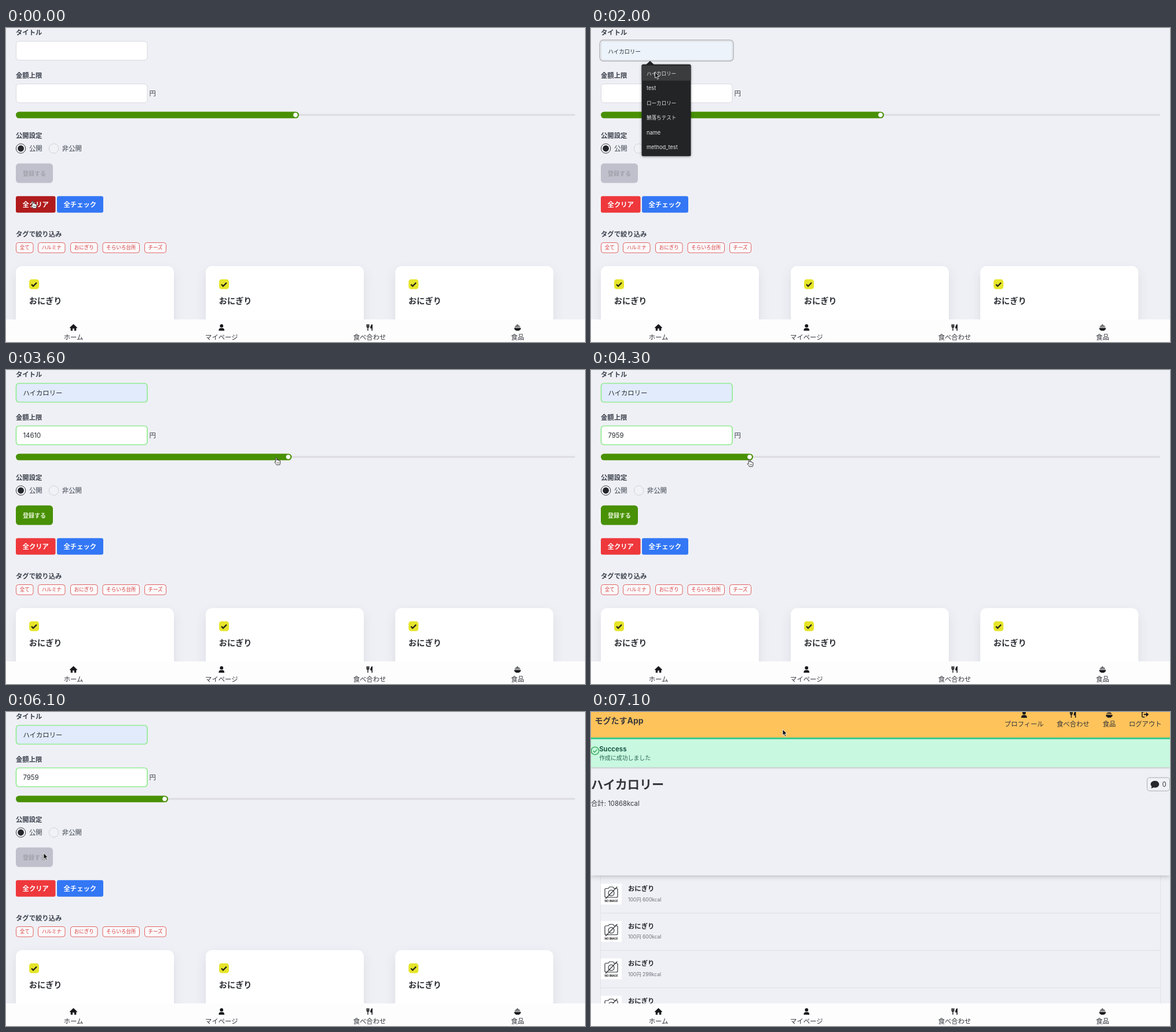
Recreate the animation shown at these times as an HTML page. Size 1000x542 px, loop 7.2 s.

```html
<!DOCTYPE html>
<html lang="ja">
<head>
<meta charset="utf-8">
<title>食べ合わせ登録</title>
<style>
  html, body { margin: 0; width: 100%; height: 100%; overflow: hidden; background: #eff0f5; }
  svg { display: block; width: 100%; height: 100%; }
  text { font-family: Inter, "Noto Sans CJK JP", "Noto Sans CJK", sans-serif; white-space: pre; }
  .card { filter: drop-shadow(0 8px 9px rgba(30, 35, 60, .09)); }
  .panel { filter: drop-shadow(0 2px 4px rgba(30, 35, 60, .25)); }
</style>
</head>
<body>
<svg id="stage" viewBox="0 0 1000 542"></svg>
<script>
const LOOP = 7200, STEP = 100;
const INK = '#3a404c', DARK = '#262a30', GREEN = '#489004', LIME = '#93ec93';

// Text is placed by its vertical middle.
const text = (x, mid, str, size = 11.35, fill = INK, extra = '') =>
  `<text x="${x}" y="${mid + size * .37}" font-size="${size}" fill="${fill}" ${extra}>${str}</text>`;
const bold = (x, mid, str, size, fill, extra = '') =>
  text(x, mid, str, size, fill, 'font-weight="700" ' + extra);
const rect = (x, y, w, h, r, fill, extra = '') =>
  `<rect x="${x}" y="${y}" width="${w}" height="${h}" rx="${r}" fill="${fill}" ${extra}/>`;
const circle = (x, y, r, fill, extra = '') =>
  `<circle cx="${x}" cy="${y}" r="${r}" fill="${fill}" ${extra}/>`;
const path = (d, fill, extra = '') => `<path d="${d}" fill="${fill}" ${extra}/>`;
const line = (color, width) =>
  `stroke="${color}" stroke-width="${width}" stroke-linecap="round" stroke-linejoin="round"`;
const group = (id, body, extra = '') => `<g id="${id}" ${extra}>${body}</g>`;
const at = (x, y, body) => `<g transform="translate(${x} ${y})">${body}</g>`;

const icons = {
  home: path('M-6.6 .2L0-6L6.6 .2L5.6 1.2L4.8 .5V5.5H1.4V1.8H-1.4V5.5H-4.8V.5L-5.6 1.2Z', '#17181b'),
  user: circle(0, -2.8, 2.9, '#17181b') + path('M-5 5.6C-5 2.4-3.4 1-1.4 1H1.4C3.4 1 5 2.4 5 5.6Z', '#17181b'),
  fork: path('M-4.7-5V-1.6Q-4.7 0-3 0Q-1.2 0-1.2-1.6V-5M-3-5V5', 'none', line('#17181b', 1.4)) +
    path('M5-5.8V5.4H3.4V1.4H1.2C1-2.4 2.6-5.2 5-5.8Z', '#17181b'),
  bowl: path('M-5.8 .7H5.8C5.8 3 4.6 4.2 3 4.8V5.4H-3V4.8C-4.6 4.2-5.8 3-5.8 .7Z', '#17181b') +
    path('M-4.6-1H4.8M-3.2-2.9H3.4M-1.2-4.6H1.4', 'none', 'stroke="#17181b" stroke-width="1.5" stroke-dasharray="1.6 .7"'),
  exit: path('M-1.5-4.5H-4.2Q-5.5-4.5-5.5-3.2V3.2Q-5.5 4.5-4.2 4.5H-1.5', 'none', line('#17181b', 1.6)) +
    path('M-2.5-1H1.5V-4L6 0L1.5 4V1H-2.5Z', '#17181b')
};
const navItem = (x, y, icon, label) =>
  at(x, y, icons[icon]) + text(x, y + 16.7, label, 11.35, '#303238', 'text-anchor="middle"');

const field = (id, y) =>
  rect(15.2, y - 1.8, 230.8, 36.6, 6.5, '#f4f5f8', `id="${id}Ring" stroke="#b4b6bc" stroke-width="1.5"`) +
  rect(17.5, y + .5, 226.5, 32.5, 5, '#fff', `id="${id}Box" stroke="#d8d9df"`) +
  text(29.5, y + 17, '', 11.35, DARK, `id="${id}Text"`);

const popup = (id, y, width, items) => group(id,
  path(`M95 ${y + .5}L102 ${y - 6}L109 ${y + .5}Z`, '#222426') +
  rect(87.5, y, width, 158.5, 2.5, '#222426', 'style="filter:drop-shadow(0 1px 2px rgba(0,0,0,.35))"') +
  rect(87.5, y + 2, width, 26, 0, '#3a3c3e', `id="${id}Hover"`) +
  items.map((s, i) => text(96, y + 15.7 + 25.5 * i, s, /^\w+$/.test(s) ? 9.25 : 8.55, '#e6e7e9')).join(''));

const tags = [[17.5, 29.5, '全て'], [55.5, 46.5, 'ハルミナ'], [111.5, 46.5, 'おにぎり'], [167, 63.5, 'そらいろ台所'], [239.5, 37, 'チーズ']]
  .map(([x, w, s]) => rect(x, 370.5, w, 17.5, 4, '#fbf9fb', 'stroke="#e06464"') +
    text(x + w / 2, 379.3, s, 8.55, '#d83c3c', 'text-anchor="middle"')).join('');

const card = x => rect(x, 411, 273, 160, 11, '#fff', 'class="card"') +
  rect(x + 23, 433.8, 17, 17, 4.5, '#e6e52b') +
  path(`M${x + 27} 442.6l3 3l6-6`, 'none', 'stroke="#26261a" stroke-width="2.2"') +
  bold(x + 22.8, 470.5, 'おにぎり', 14.2, '#2a2d33');

const form =
  bold(17, 8.3, 'タイトル') + field('title', 22.5) +
  bold(17, 82.2, '金額上限') + field('price', 96) + text(247.5, 113.2, '円') +
  group('spinner', rect(221.8, 106, 10.5, 15, 2.5, '#ececee') +
    path('M224.8 111.6L227 108.8L229.2 111.6ZM224.8 115.2L227 118L229.2 115.2Z', '#4a4c50')) +
  rect(29.2, 106.5, 1, 14, 0, '#333', 'id="caret"') +
  rect(17, 148.4, 966, 3.2, 1.6, '#dbdce1') +
  rect(17, 144.4, 489, 11.4, 5.7, GREEN, 'id="bar"') + circle(500, 150.1, 3.8, '#fff', 'id="thumb"') +
  bold(17, 185.5, '公開設定') +
  circle(25.6, 208, 8.2, '#f6f7f9', 'stroke="#30343a"') + circle(25.6, 208, 5.4, '#23262b') + text(40, 208.2, '公開') +
  circle(82.5, 208, 8.2, '#f1f2f6', 'stroke="#d0d1d7"') + text(96.8, 208.2, '非公開') +
  rect(17, 233.8, 64, 33.8, 5.5, '#c0c0cc', 'id="send"') + bold(29, 250.8, '登録する', 10, '#a0a1aa', 'id="sendText"') +
  rect(17, 290.3, 68.5, 28.5, 3, '#ee383c', 'id="clear"') + bold(28.6, 304.5, '全クリア', 11.35, '#fff') +
  rect(88, 290.3, 80, 28.5, 3, '#3377f5') + bold(99.5, 304.5, '全チェック', 11.35, '#fff') +
  bold(17, 355.5, 'タグで絞り込み') + tags +
  [17, 345, 672.3].map(card).join('') +
  popup('titleList', 62.8, 85, ['ハイカロリー', 'test', 'ローカロリー', '鯖落ちテスト', 'name', 'method_test']) +
  popup('priceList', 136.5, 68.5, ['9', '1000', '100000', '5000000', 'aaa', '1000000']);

const noImage = rect(17, -17.7, 36, 36, 0, '#fff') +
  path('M26-9.5H30L31.8-12H38L39.8-9.5H44Q46-9.5 46-7.5V4Q46 6 44 6H26Q24 6 24 4V-7.5Q24-9.5 26-9.5Z', 'none', line('#33353a', 1.2)) +
  circle(35, -1.6, 5, 'none', 'stroke="#33353a" stroke-width="1.2"') +
  path('M25.5 8L45-12', 'none', line('#33353a', 1.3)) +
  bold(35, 12.3, 'NO IMAGE', 4.6, '#222', 'text-anchor="middle"');
const row = (kcal, i) => at(0, 314 + 64.5 * i,
  noImage + bold(64, -9, 'おにぎり', 11.35, '#22252b') + text(64, 9.7, `100円 ${kcal}kcal`, 8.5, '#6c707a') +
  rect(17, 32.5, 966, 1.2, 0, '#e1e2e7'));

const result =
  path('M16.5 270V542M983.5 270V542', 'none', 'stroke="#e1e2e7"') +
  [600, 600, 299, 299].map(row).join('') +
  rect(0, 90, 1000, 192, 0, '#eff0f5', 'class="panel"') +
  rect(0, 44, 1000, 51.5, 0, '#c8f8e0', 'style="filter:drop-shadow(0 1px 1.5px rgba(0,0,0,.25))"') +
  rect(0, 0, 1000, 44.3, 0, '#ffc35c') + rect(0, 44, 1000, 3, 0, '#3ec98c') +
  bold(6.5, 14.5, 'モグたすApp', 14, '#3b3b3b') +
  navItem(748, 4.3, 'user', 'プロフィール') + navItem(832.5, 4.3, 'fork', '食べ合わせ') +
  navItem(895, 4.3, 'bowl', '食品') + navItem(957.3, 4.3, 'exit', 'ログアウト') +
  circle(7, 67, 6.6, 'none', 'stroke="#2fa650" stroke-width="1.3"') +
  path('M4 67.3l2.2 2.2l4-4.4', 'none', line('#2fa650', 1.3)) +
  bold(14.2, 64.3, 'Success', 11.35, '#1d5b49') + text(14.2, 79.3, '作成に成功しました', 9.9, '#2a6654') +
  bold(0, 125, 'ハイカロリー', 21.1, '#34373d') + text(0, 157.8, '合計: 10868kcal', 11.35, '#34373d') +
  rect(960.5, 113.2, 39, 23, 4.5, '#f0f1f5', 'stroke="#a9abb3"') +
  path('M967 131.5Q968.3 130.2 968.5 128.6C964 124 968 118.7 974 118.7C978.3 118.7 981.2 121.5 981.2 124.7C981.2 128.8 976.5 131.6 971.5 130.3Q969.5 131.6 967 131.5Z', '#25272c') +
  text(986.5, 125.2, '0', 11.35, '#34373d');

const cursors = {
  arrow: path('M0 0V10.4L2.4 8.3L4.2 12.3L6 11.5L4.2 7.6H7.4Z', '#111', 'stroke="#fff" stroke-width=".8"'),
  hand: path('M-.9 6.5V1Q-.9-.2 .1-.2Q1.1-.2 1.1 1V4.3Q3-.1 3.2 4.6Q5 3.4 5.1 5.2Q7 4.5 7 6.4V8.6Q7 10.2 6 12.2H.6Q-.6 10.2-2.8 7.8Q-2.6 6.1-.9 7.4Z', '#fff', line('#222', .9)) +
    path('M1.7 7.6V10M3.3 7.6V10M4.9 7.6V10', 'none', 'stroke="#222" stroke-width=".6"'),
  beam: path('M-2.2-5.5Q0-5.5 0-4Q0-5.5 2.2-5.5M0-4V4M-2.2 5.5Q0 5.5 0 4Q0 5.5 2.2 5.5M-1.2 1.8H1.2', 'none', line('#222', 1))
};

document.getElementById('stage').innerHTML =
  rect(0, 0, 1000, 542, 0, '#eff0f5') + group('form', form) + group('result', result) +
  rect(0, 503, 1000, 40, 0, '#fdfdfe') +
  navItem(116.5, 517, 'home', 'ホーム') + navItem(372.3, 517, 'user', 'マイページ') +
  navItem(628, 517, 'fork', '食べ合わせ') + navItem(883.5, 517, 'bowl', '食品') +
  group('cursor', Object.keys(cursors).map(k => group(k, cursors[k])).join(''));

const el = id => document.getElementById(id);
const set = (id, attrs) => { for (const k in attrs) el(id).setAttribute(k, attrs[k]); };
const show = (id, on) => set(id, { visibility: on ? 'inherit' : 'hidden' });

// time, x, y, pointer shape from then on
const track = [
  [0, 46, 299, 'hand'], [300, 46, 299, 'hand'], [500, 62, 245, 'arrow'], [900, 93, 145, 'arrow'],
  [1200, 101, 42, 'beam'], [1500, 101, 42, 'beam'], [1700, 108, 66, 'arrow'], [2000, 110.5, 76, 'arrow'],
  [2400, 110.5, 77, 'arrow'], [2600, 97, 114.5, 'beam'], [3100, 97, 114.5, 'beam'], [3200, 190, 125, 'beam'],
  [3500, 499, 151, 'hand'], [4200, 273, 154.5, 'hand'], [4500, 273, 154.5, 'hand'], [4700, 200, 185, 'arrow'],
  [5100, 65, 243.5, 'hand'], [5500, 65, 243.5, 'arrow'], [6300, 65, 243.5, 'arrow'], [6900, 331, 30, 'arrow'],
  [LOOP, 331, 30, 'arrow']
];
const ease = p => p * p * (3 - 2 * p);
const mix = (a, b, p) => a + (b - a) * p;
const progress = (t, from, to) => ease(Math.min(1, Math.max(0, (t - from) / (to - from))));

function drawField(id, value, focused, filled, fill, size) {
  show(id + 'Ring', focused);
  set(id + 'Box', { fill, stroke: filled ? LIME : '#d8d9df', 'stroke-width': filled ? 1.7 : 1 });
  el(id + 'Text').textContent = value;
  set(id + 'Text', { 'font-size': size });
}

function draw(t) {
  const i = track.findIndex((k, n) => t < track[n + 1][0]);
  const [t0, x0, y0, shape] = track[i], [t1, x1, y1] = track[i + 1];
  const p = (t - t0) / (t1 - t0);
  set('cursor', { transform: `translate(${mix(x0, x1, p)} ${mix(y0, y1, p)})` });
  for (const k in cursors) show(k, k === shape);

  const done = t >= 6300;
  show('form', !done);
  show('result', done);
  set('clear', { fill: t < 400 ? '#b01b1c' : '#ee383c' });

  const chosen = t >= 2300, preview = t >= 1800 && !chosen;
  drawField('title', chosen || preview ? 'ハイカロリー' : '', t >= 1300 && t < 2600, chosen,
    chosen ? '#e1ebfc' : preview ? '#ecf3fb' : '#fff', preview ? 9.45 : 11.35);
  show('titleList', t >= 1400 && !chosen && !done);
  show('titleListHover', preview);

  const editing = t >= 2700 && t < 3500, dragged = t >= 3600;
  const drag = progress(t, 3500, 4200), thumb = mix(500, 274, drag);
  drawField('price', dragged ? Math.round(mix(15000, 7959, drag)) : '', editing, dragged, '#fff', 11.35);
  show('spinner', editing);
  show('caret', editing);
  show('priceList', editing);
  show('priceListHover', false);
  set('bar', { width: thumb - 11 });
  set('thumb', { cx: thumb });

  const ready = dragged && t < 5500;
  set('send', { fill: ready ? GREEN : '#c0c0cc' });
  set('sendText', { fill: ready ? '#e6f5d8' : '#a0a1aa' });
}

const start = performance.now();
function tick() {
  const t = (performance.now() - start) % LOOP;
  draw(Math.floor(t / STEP) * STEP);
  requestAnimationFrame(tick);
}
tick();
</script>
</body>
</html>
```
